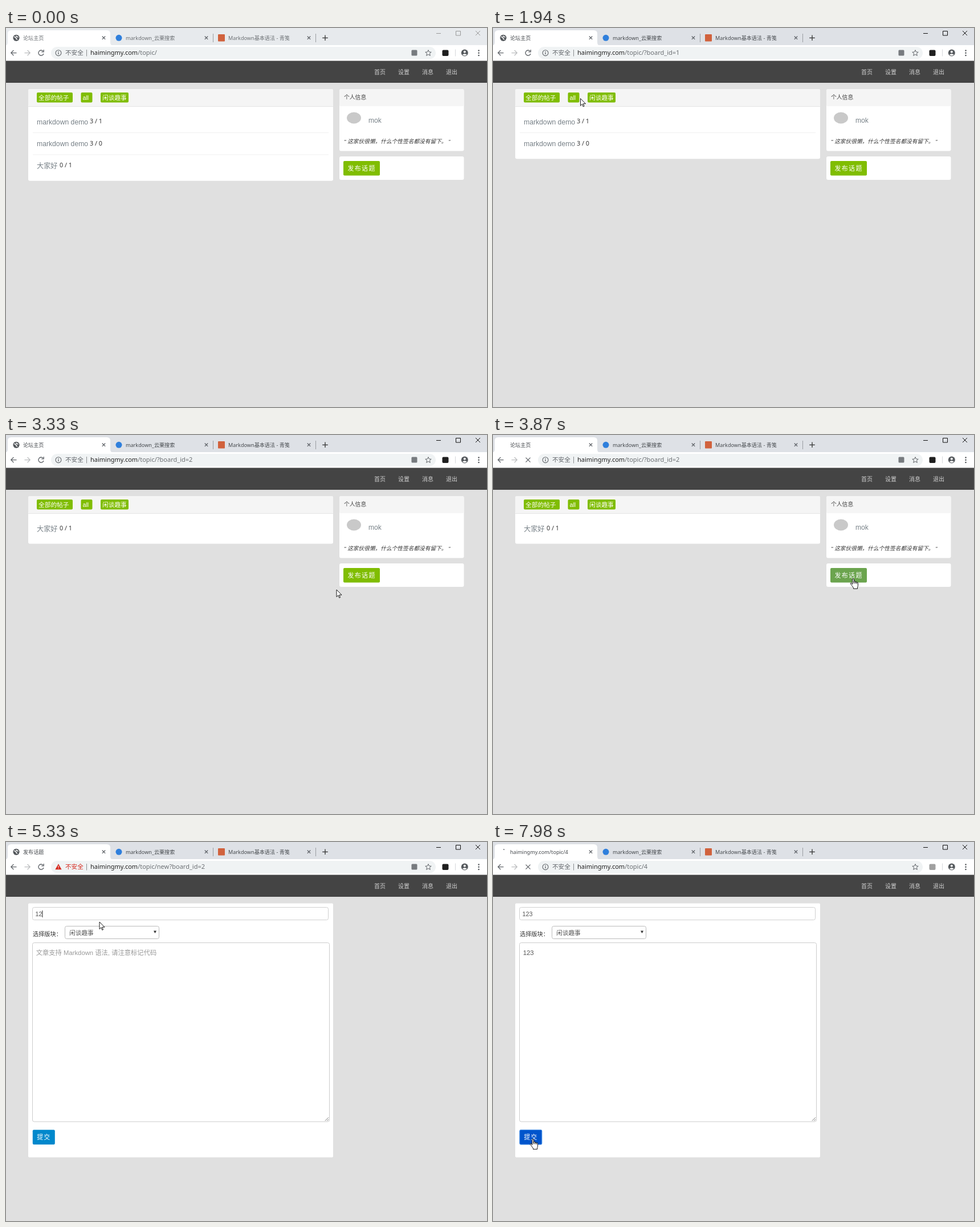
These frames come from a looping animation (844x664 px, 8000 ms). An HTML page:

```html
<!DOCTYPE html>
<html lang="zh-CN">
<head>
<meta charset="utf-8">
<title>论坛</title>
<style>
html, body { margin: 0; height: 100%; overflow: hidden; background: #e0e0e0; }
svg { display: block; width: 844px; height: 664px; }
text { font-family: "Liberation Sans", "Noto Sans CJK SC", "Noto Sans CJK", sans-serif; white-space: pre; }
.ui { font-family: "Noto Sans", "Noto Sans CJK SC", "Noto Sans CJK", sans-serif; }
.tab { fill: #45494d; }
.strip { fill: #dee1e6; }
.win { stroke: #111; fill: none; }
.inactive .strip { fill: #e7eaed; }
.inactive .tab { fill: #6b6f73; }
.inactive .win { stroke: #999; }
.line { fill: none; stroke: #5f6368; stroke-width: 1.3; }
</style>
</head>
<body>
<svg id="stage" viewBox="0 0 844 664"></svg>
<script>
const LOOP = 8000, GREEN = '#80bd01';
const stage = document.getElementById('stage');

const rect = (x, y, w, h, fill, r = 0, extra = '') =>
  `<rect x="${x}" y="${y}" width="${w}" height="${h}" rx="${r}" fill="${fill}" ${extra}/>`;
const text = (x, y, size, fill, str, extra = '') =>
  `<text x="${x}" y="${y}" font-size="${size}" fill="${fill}" ${extra}>${str}</text>`;
const path = (d, cls = 'line', extra = '') => `<path d="${d}" class="${cls}" ${extra}/>`;
const cross = (x, y, r, cls = 'line', extra = '') =>
  path(`M${x - r} ${y - r}l${2 * r} ${2 * r}m0 ${-2 * r}l${-2 * r} ${2 * r}`, cls, extra);
const group = (id, body) => `<g id="${id}">${body}</g>`;

function browser() {
  const tabText = (x, str, id = '') => text(x, 20.8, 9.1, '', str, `class="ui tab" ${id}`);
  return rect(0, 0, 844, 32, '', 0, 'class="strip"') +
    rect(0, 30, 844, 28, '#fff') +
    path('M-3 31Q3 31 3 25V10Q3 4 9 4H177Q183 4 183 10V25Q183 31 189 31Z', '', 'fill="#fff"') +
    group('favicon', '<circle cx="18" cy="17.3" r="5.6" fill="#55595d"/>' +
      path('M14 15.5q3 0 3.5 2t2.5 2.5M18 13.5q0 2 3.5 2.5', '', 'fill="none" stroke="#fff" stroke-width="1.5"')) +
    path('M18 12.8a4.7 4.7 0 1 1-.01 0', 'line', 'id="spinner"') +
    tabText(30, '', 'id="title"') +
    tabText(210, 'markdown_云栗搜索') + tabText(390, 'Markdown基本语法 - 青笺') +
    '<circle cx="198" cy="17.3" r="5.5" fill="#2f7fdc"/>' +
    rect(372, 11, 12, 12.5, '#d1623d', 1) +
    [171.5, 351.5, 531.5].map(x => cross(x, 17.2, 2.7)).join('') +
    path('M363.5 10v15M543.5 10v15', '', 'stroke="#9a9da1"') +
    path('M560 12.5v9.6M555.2 17.3h9.6', 'line', 'style="stroke:#333"') +
    path('M755 9.5h8M789.5 5.5h8v7.5h-8zM824 5l8 8m0-8l-8 8', 'win') +
    rect(79, 33, 675, 21.5, '#f0f3f4', 10.7) +
    path('M18.5 43.6H9M13.4 39l-4.6 4.6 4.6 4.6') +
    path('M32.5 43.6H42M37.6 39l4.6 4.6-4.6 4.6', 'line', 'style="stroke:#bbbdbf"') +
    path('M65 40.5A4.6 4.6 0 1 0 66 45M66.2 38v3.8h-4', 'line', 'id="reload"') +
    cross(61.5, 43.6, 4, 'line', 'id="stop"') +
    group('info', '<circle cx="92" cy="43.7" r="4.9" class="line" style="stroke-width:1.1"/>' +
      path('M92 42.8v3.4M92 40.8v1.2')) +
    group('warn', path('M92 38.3L97.6 48.2H86.4Z', '', 'fill="#d5281e"') +
      path('M92 41.5v3.2M92 45.6v1.2', '', 'stroke="#fff"')) +
    text(104, 47.4, 10.6, '#5f6368', '不安全', 'id="secure"') +
    path('M141.5 38v11.5', '', 'stroke="#8a8d90"') +
    text(148, 47.2, 11, '#222', 'haimingmy.com<tspan id="route" fill="#6b6f73"></tspan>', 'class="ui"') +
    rect(711.5, 38.5, 10, 10, '#777b7f', 1.5, 'id="translate"') +
    path('M741 38.6l1.5 3.4 3.7.3-2.8 2.4.9 3.7-3.3-2-3.3 2 .9-3.7-2.8-2.4 3.7-.3z', 'line', 'style="stroke-width:1"') +
    rect(765.5, 38.6, 11, 10.4, '#1f1f1f', 2, 'id="extension"') +
    path('M788.5 37.5v12', '', 'stroke="#d5d8db"') +
    '<circle cx="804.8" cy="43.6" r="6" fill="#55595d"/><circle cx="804.8" cy="41.7" r="2" fill="#fff"/>' +
    path('M800.8 46.8q4-3 8 0-4 3.4-8 0', '', 'fill="#fff"') +
    [39.4, 43.7, 48].map(y => `<circle cx="829.5" cy="${y}" r="1.25" fill="#4d5155"/>`).join('') +
    rect(0, 57.5, 844, 38.5, '#444') +
    ['首页', '设置', '消息', '退出'].map((s, i) => text(646 + 42 * i, 80.6, 10, '#d0d0d0', s)).join('');
}

const chips = [[54, 63, '全部的帖子'], [131.5, 20, 'all'], [166, 49, '闲谈趣事']];
const topics = [['markdown demo', '3 / 1', 147], ['markdown demo', '3 / 0', 147], ['大家好', '0 / 1', 94]];

function board(id, rows) {
  const height = 45 + 38.6 * rows.length;
  return group(id, rect(39, 107, 535, height, '#fff', 3) +
    rect(39, 107, 535, 30.5, '#f5f5f5', 3) + rect(39, 137, 535, 1, '#e5e5e5') +
    chips.map(([x, w, s]) => rect(x, 113, w, 17.5, GREEN, 2) + text(x + 3, 125.7, 10.7, '#fff', s)).join('') +
    rows.map(([name, count, x], i) => {
      const y = 168.5 + 38.6 * i;
      return text(54, y, 12.2, '#778087', name) + text(x, y - 1.3, 10.8, '#333', count, 'class="ui"') +
        (i < rows.length - 1 ? rect(47, y + 14.3, 519, 1, '#f0f0f0') : '');
    }).join(''));
}

function sidebar() {
  return group('sidebar', rect(585, 107, 218.5, 108.5, '#fff', 3) + rect(585, 107, 218.5, 30, '#f5f5f5', 3) +
    text(593, 125.4, 9.8, '#444', '个人信息') +
    '<ellipse cx="610.5" cy="157.5" rx="12.5" ry="10" fill="#c9c9c9"/>' +
    text(636, 166, 12, '#778087', 'mok') +
    text(593, 201.6, 9.7, '#333', '" 这家伙很懒，什么个性签名都没有留下。 ”', 'font-style="italic"') +
    rect(585, 225, 218.5, 41, '#fff', 3) +
    rect(592, 233, 64, 25.5, GREEN, 2, 'id="post"') +
    text(599.5, 249.7, 11, '#fff', '发布话题', 'letter-spacing="1.3"'));
}

function form() {
  const box = (x, y, w, h, c) => rect(x, y, w, h, '#fff', 3, `stroke="${c}"`);
  return group('form', rect(39, 107.5, 535, 445, '#fff', 2) +
    box(46.5, 114.5, 519, 22, '#d0d0d0') +
    text(47, 164.7, 10.2, '#333', '选择版块：') +
    box(103.5, 147.5, 165, 22, '#bbb') + text(111, 162.6, 10.7, '#555', '闲谈趣事') +
    path('M259 155.5h5l-2.5 4.6z', '', 'fill="#333"') +
    box(46.5, 176.5, 521, 313.5, '#ccc') +
    path('M560 488.5l6-6M563.5 488.5l2.5-2.5', '', 'stroke="#777"') +
    text(51.5, 129.7, 10.7, '', '', 'id="subject"') + text(52.7, 198, 11.3, '', '', 'id="article"') +
    rect(51, 120, 1, 12, '#222', 0, 'id="caret"') +
    rect(46.8, 504.3, 39, 25.7, '#08c', 2, 'id="submit"') +
    text(54.3, 521.2, 11, '#fff', '提交', 'letter-spacing="1"'));
}

function cursors() {
  const ink = 'fill="#fff" stroke="#000" stroke-linejoin="round"';
  return group('cursor',
    group('arrow', path('M0 0V12.6L2.9 9.8 4.8 14.3 6.6 13.5 4.7 9.2H9Z', '', ink + ' stroke-width=".9"')) +
    group('hand', path('M5 12.5V2.2a1.5 1.5 0 0 1 3 0V8v-.8a1.5 1.5 0 0 1 3 0v1.4a1.4 1.4 0 0 1 2.8 .2v.8a1.3 1.3 0 0 1 2.6 .2V15q0 2-1 3.5V21.5H7V19.5Q5 17 3.5 14.5L1.2 11.6q-.6-1.6 .8-2 1.2 0 3 2.9M8 7v4M11 8.5V11M13.8 9.5V11.5',
      '', ink + ' stroke-width="1.1" transform="scale(.85) translate(-6.5 -.6)"')) +
    group('beam', path('M-2.5-6.5h2l.5.5.5-.5h2M0-6V6M-2.5 6.5h2l.5-.5.5.5h2', '', 'fill="none" stroke="#222"')));
}

stage.innerHTML = browser() + board('board0', topics) + board('board1', topics.slice(0, 2)) +
  board('board2', topics.slice(2)) + sidebar() + form() + cursors();

const el = {};
stage.querySelectorAll('[id]').forEach(node => el[node.id] = node);
const show = (id, on) => el[id].style.display = on ? '' : 'none';
const fill = (id, color) => el[id].setAttribute('fill', color);

// time, x, y of the pointer
const track = [
  [0, 749, 642], [70, 749, 642], [840, 133, 136], [920, 133, 136], [990, 124, 131], [1235, 124, 131],
  [1310, 139, 123.5], [1780, 139, 123.5], [2250, 196.5, 123.5], [2720, 196.5, 123.5], [3330, 580, 271],
  [3560, 632, 251.5], [3950, 632, 251.5], [4640, 163, 139], [4720, 164, 140], [5400, 164, 140],
  [5780, 134, 206], [5950, 124, 202], [6330, 124, 202], [6560, 73, 505.5], [6710, 70, 520.5], [LOOP, 70, 520.5]
];
const STEP = 77;

function pointer(t) {
  const i = track.findIndex(k => k[0] > t);
  const [t0, x0, y0] = track[i - 1], [t1, x1, y1] = track[i];
  const k = Math.floor((t - t0) / STEP) * STEP / (t1 - t0);
  const e = k * k * (3 - 2 * k);
  return [x0 + (x1 - x0) * e, y0 + (y1 - y0) * e];
}

const inside = (x, y, [l, t, r, b]) => x >= l && x <= r && y >= t && y <= b;
const listLinks = [...chips.map(([x, w]) => [x, 113, x + w, 130.5]), [592, 233, 656, 259]];

function shape(x, y, t) {
  if (t < 4020) return listLinks.some(b => inside(x, y, b)) ? 'hand' : 'arrow';
  if (inside(x, y, [47, 504, 86, 530])) return 'hand';
  return inside(x, y, [46, 114, 566, 137]) || inside(x, y, [46, 176, 568, 490]) ? 'beam' : 'arrow';
}

const between = (t, a, b) => t >= a && t < b;
const mix = (a, b, k) => {
  k = Math.min(1, Math.max(0, k));
  return `rgb(${a.map((v, i) => Math.round(v + (b[i] - v) * k))})`;
};
const typed = (t, start) => '123'.slice(0, t < start ? 0 : 1 + Math.floor((t - start) / STEP));
const loads = [[1560, 1710], [2320, 2470], [3870, 3950], [7890, LOOP]];
const pages = [
  [0, 'board0', '/topic/', '论坛主页'], [1710, 'board1', '/topic/?board_id=1', '论坛主页'],
  [2470, 'board2', '/topic/?board_id=2', '论坛主页'], [3950, 'form', '/topic/new?board_id=2', '发布话题'],
  [7980, 'form', '/topic/4', 'haimingmy.com/topic/4']
];

function field(id, value, hint) {
  el[id].textContent = value || hint;
  fill(id, value ? '#555' : '#999');
}

function render(t) {
  stage.classList.toggle('inactive', t < 1480);
  const [, view, route, title] = pages.filter(p => p[0] <= t).pop();
  ['board0', 'board1', 'board2', 'form'].forEach(id => show(id, id === view));
  show('sidebar', view !== 'form');
  el.route.textContent = route;
  el.title.textContent = title;

  const load = loads.find(([a, b]) => between(t, a, b));
  show('favicon', !load);
  show('spinner', load);
  show('stop', load);
  show('reload', !load);
  if (load) el.spinner.setAttribute('stroke-dasharray', `${(t - load[0]) / 40} 99`);

  const warned = between(t, 5250, 7980);
  show('warn', warned);
  show('info', !warned);
  fill('secure', warned ? '#d5281e' : '#5f6368');
  show('translate', t < 7980);
  fill('extension', t < 7980 ? '#1f1f1f' : '#a0a0a0');

  const subject = typed(t, 5250), article = typed(t, 6180);
  field('subject', subject, '标题字数 10 字以上');
  field('article', article, '文章支持 Markdown 语法, 请注意标记代码');
  const inArticle = t >= 6100;
  el.caret.setAttribute('x', inArticle ? 53 + 6.2 * article.length : 51 + 6.2 * subject.length);
  el.caret.setAttribute('y', inArticle ? 187.5 : 120);
  show('caret', t < 7810 && !between(t, 4450, 4950) && !between(t, 6940, 7490));

  fill('post', mix([128, 189, 1], [107, 164, 78], (t - 3520) / 200));
  fill('submit', mix([0, 136, 204], [0, 85, 204], (t - 6570) / 130));
  el.submit.setAttribute('stroke', t >= 7810 ? '#4c94e8' : 'none');

  const [x, y] = pointer(t), kind = shape(x, y, t);
  show('cursor', t >= 70);
  el.cursor.setAttribute('transform', `translate(${x} ${y})`);
  ['arrow', 'hand', 'beam'].forEach(id => show(id, id === kind));
}

const start = performance.now();
function tick() {
  render((performance.now() - start) % LOOP);
  requestAnimationFrame(tick);
}
tick();
</script>
</body>
</html>
```
